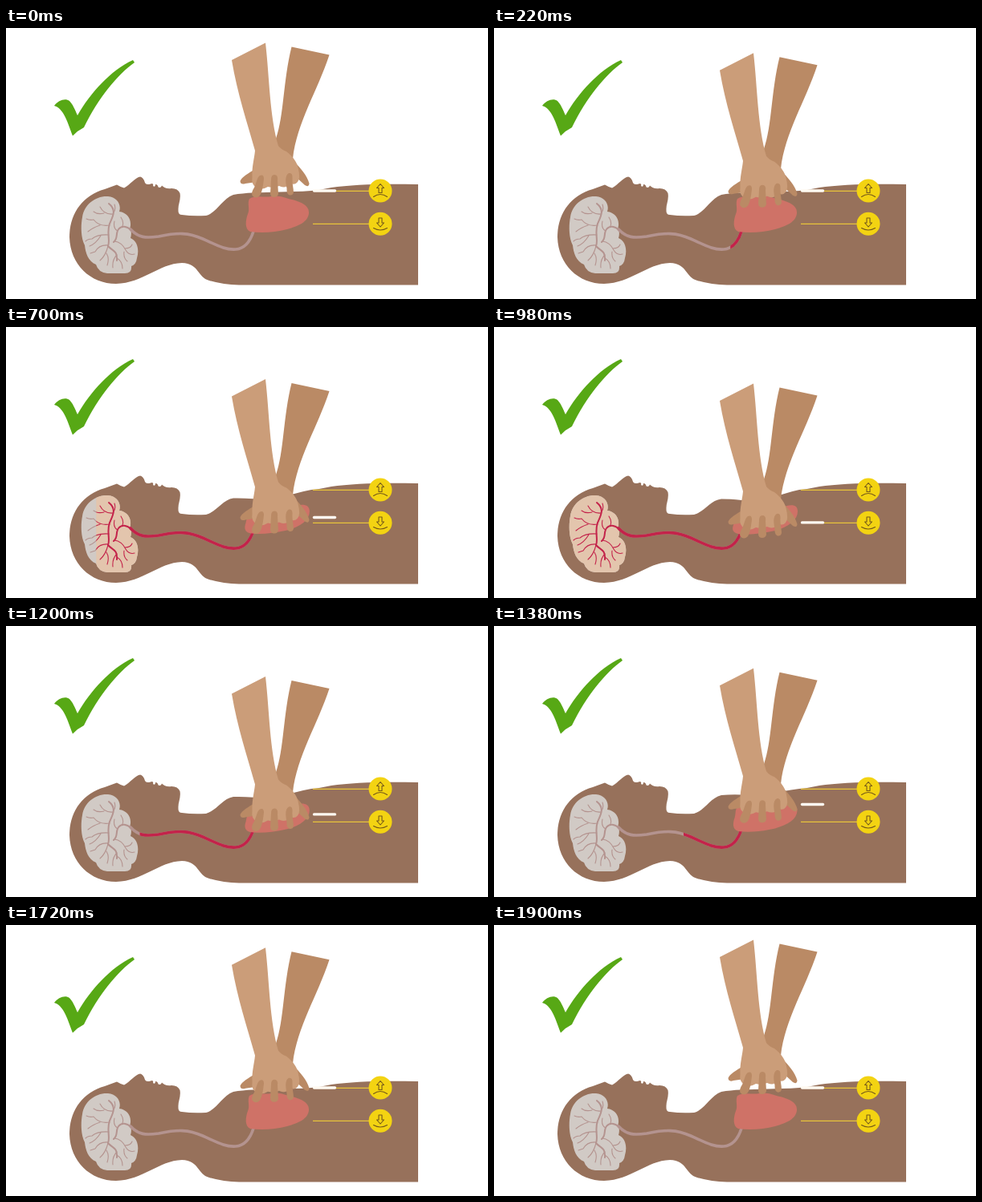
Write an HTML page that moves like this. It is 600 px wide and 338 px high and loops after 1920 ms.

```html
<!DOCTYPE html>
<html lang="en">
<head>
<meta charset="utf-8">
<title>Chest compressions</title>
<style>
html, body { margin: 0; width: 100%; height: 100%; overflow: hidden; background: #fff; }
svg { display: block; width: 100vw; height: 100vh; }
.line { fill: none; stroke-linecap: round; stroke-linejoin: round; }
</style>
</head>
<body>
<svg viewBox="0 0 600 338">
  <defs><clipPath id="wipe"><rect id="edge" y="190" width="500" height="140"/></clipPath></defs>

  <path fill="#57a815" d="M60 97C65 90 74 87 79 91C83 95 86 102 89 109C105 81 130 53 158 40L160 43C139 58 115 87 97 124Q89 128 83 134.500C77 119 72 100 60 97Z"/>
  <path id="body" fill="#97715b"/>
  <g id="dry"></g>
  <g id="wet" clip-path="url(#wipe)"></g>
  <path id="heart" fill="#cf7267"/>

  <g id="hands">
    <path fill="#ba8a65" d="M355.500 23.500L402.500 33.500C388 78 362 118 357 163L336 165V138C346 110 345 65 355.500 23.500Z"/>
    <path fill="#ba8a65" d="M310 176C302 181 293 186 291.500 191Q292 196 298 194L312 192ZM358 166C366 174 375 184 377.500 194Q377 199 372 196L359 184Z"/>
    <path fill="#cb9d79" d="M281 40L323 18.500C328 62 328 110 339 147Q343 152 349 154C357 160 362 167 363.500 174Q367 188 363 192Q360 196 355 194Q347 201 340 197Q332 200 326 198Q318 203 312 199Q305 196 306.500 186C306 172 309 164 310 153C300 117 288 82 281 40Z"/>
    <path fill="#ba8a65" d="M316 184Q321 182 321 188C320 197 319 204 316 209Q311 214 306.500 209Q305 205 309 199C312 193 312 187 316 184ZM334 183Q339 183 338 190L339 207Q338 211 334 211Q329 211 329 206L330 189Q330 183 334 183ZM352 181Q357 180 356.500 187C356 194 358 200 358 205Q357 209 353 208.500Q349 207 349.500 200C348 192 347 184 352 181Z"/>
  </g>

  <g stroke="#e8c33a" stroke-width="1.300"><path d="M382 203.300H455M382 244.300H455"/></g>
  <path id="bar" class="line" d="M383.500 203H409.500" stroke="#fffaf2" stroke-width="3.400"/>
  <g fill="#f3d312"><circle cx="466" cy="203" r="14.500"/><circle cx="466" cy="244.200" r="14.500"/></g>
  <g class="line" stroke="#75591a" stroke-width="1.100">
    <path d="M466 194.500L470.500 199.500H468V205.500H464V199.500H461.500ZM457.500 210.500Q466 204.500 474.500 210.500"/>
    <path d="M466 248L470.500 243H468V237H464V243H461.500ZM457.500 249.500Q466 254.500 474.500 249.500"/>
  </g>
</svg>
<script>
const $ = id => document.getElementById(id);
const LOOP = 1920;

const brain = "M127 210C138 211 144 220 141 229C151 230 157 239 154.500 249Q157 256 155 262C164 266 166 277 163 287Q162 295 156 297Q157 306 148 306H126Q115 305 112 295C102 291 99 280 98 271C93 262 93 246 95 236C97 220 112 209 127 210Z";
const trunk = "M156 252C150 247 144 246 140 251C136 256 140 262 134 267M128 219C138 227 133 235 129 244C125 255 130 265 127 272C132 278 139 277 138 290";
const twigs = "M134 230Q137 226 135 220M133 232Q122 233 117 223M122 231Q114 233 109 229M129 246Q116 248 109 239Q104 240 100 238M117 246Q108 249 102 254M128 258Q114 257 107 263Q102 263 99 266M118 259Q112 269 104 272M127 271Q116 270 111 279L105 281M127 272Q124 284 117 290M125 281Q129 287 126 296M138 283Q132 289 133 299M138 287Q145 291 145 300M135 266Q144 267 149 277Q153 284 160 282M148 275Q155 275 157 270M147 279Q146 287 151 291M145 247Q147 242 143 236M139 253Q133 250 135 241";
const artery = "M155 251C165 262 174 262 190 260C214 255 227 255 245 263C263 271 273 277 286 276C299 275 305 264 308.500 252";

const flow = (tissue, blood) => `<path d="${brain}" fill="${tissue}"/>
  <g class="line" stroke="${blood}">
    <path d="${artery}" stroke-width="3.600"/>
    <path d="${trunk}" stroke-width="2"/>
    <path d="${twigs}" stroke-width="1.100"/>
  </g>`;
$("dry").innerHTML = flow("#d1cac5", "#b4938f");
$("wet").innerHTML = flow("#e3c5ad", "#c3234a");

const relaxed = "M303 213C312 208 322 212 330 210C340 208 348 212 356 214C368 217 378 222 377 231C376 242 364 247 350 251C335 255 318 256 304 254C297 251 298 240 301 232C304 226 300 218 303 213Z";
const pressed = "M303 240C312 238 322 238 330 236C340 234 348 230 356 226C368 221 378 220 378 230C378 240 368 249 350 254C335 257 318 260 304 258C295 256 297 250 298 247C298 244 300 241 303 240Z";

// Blend two paths that share the same commands
function blend(a, b, k) {
  const to = b.match(/[\d.]+/g);
  let i = 0;
  return a.replace(/[\d.]+/g, n => +n + (to[i++] - n) * k);
}

const bodyPath = c => `M513 195C470 194 430 195 405 199Q392 202 380 203Q370 ${204 + c} 358 ${204 + 5 * c}
  L308 ${205.5 + 10.5 * c}Q294 ${206 + 8.5 * c} 283 ${208 + 6.5 * c}C269 ${213 + 3 * c} 263 230 249 234Q232 235 219 233
  Q214 233 214.500 227C214 220 218 214 216.500 206Q214 200 206 200Q198 201 194 196.500Q193 200 189.500 198.500
  Q189 195 186 195Q186 199 183 197Q184 193 180 194.500Q174 196 173 193Q171 186 167 185.500C160 187 155 195 147 199.500
  Q142 198 138 195.500Q131 198 123 201C94 209 79 233 79 261C80 295 105 319 137 319C171 318 190 294 219 293
  C241 294 238 311 253 315Q270 320 290 320.500H513Z`;

// [time, depth, speed] of the hands
const keys = [[0, 0, 0], [420, 30.5, .067], [700, 46.5, .04], [960, 52, 0],
  [1200, 44.5, -.05], [1560, 22.5, -.066], [LOOP, 0, 0]];

function depthAt(t) {
  const i = keys.findIndex(k => k[0] > t);
  const [t0, y0, v0] = keys[i - 1], [t1, y1, v1] = keys[i];
  const d = t1 - t0, u = (t - t0) / d, w = 1 - u;
  return w * w * (1 + 2 * u) * y0 + u * u * (3 - 2 * u) * y1 + u * w * d * (w * v0 - u * v1);
}

function draw(now) {
  const t = now % LOOP, depth = depthAt(t);
  const press = Math.max(0, (depth - 17.9) / 34.1);
  $("hands").setAttribute("transform", `translate(0 ${depth})`);
  $("bar").setAttribute("transform", `translate(0 ${41 * press})`);
  $("body").setAttribute("d", bodyPath(press));
  $("heart").setAttribute("d", blend(relaxed, pressed, press));
  // Blood advances to the brain, then drains back to the heart
  $("edge").setAttribute("x", Math.max(309 - .379 * (t - 182), 94 + .386 * (t - 1013)));
  requestAnimationFrame(() => draw(performance.now()));
}
draw(performance.now());
</script>
</body>
</html>
```
